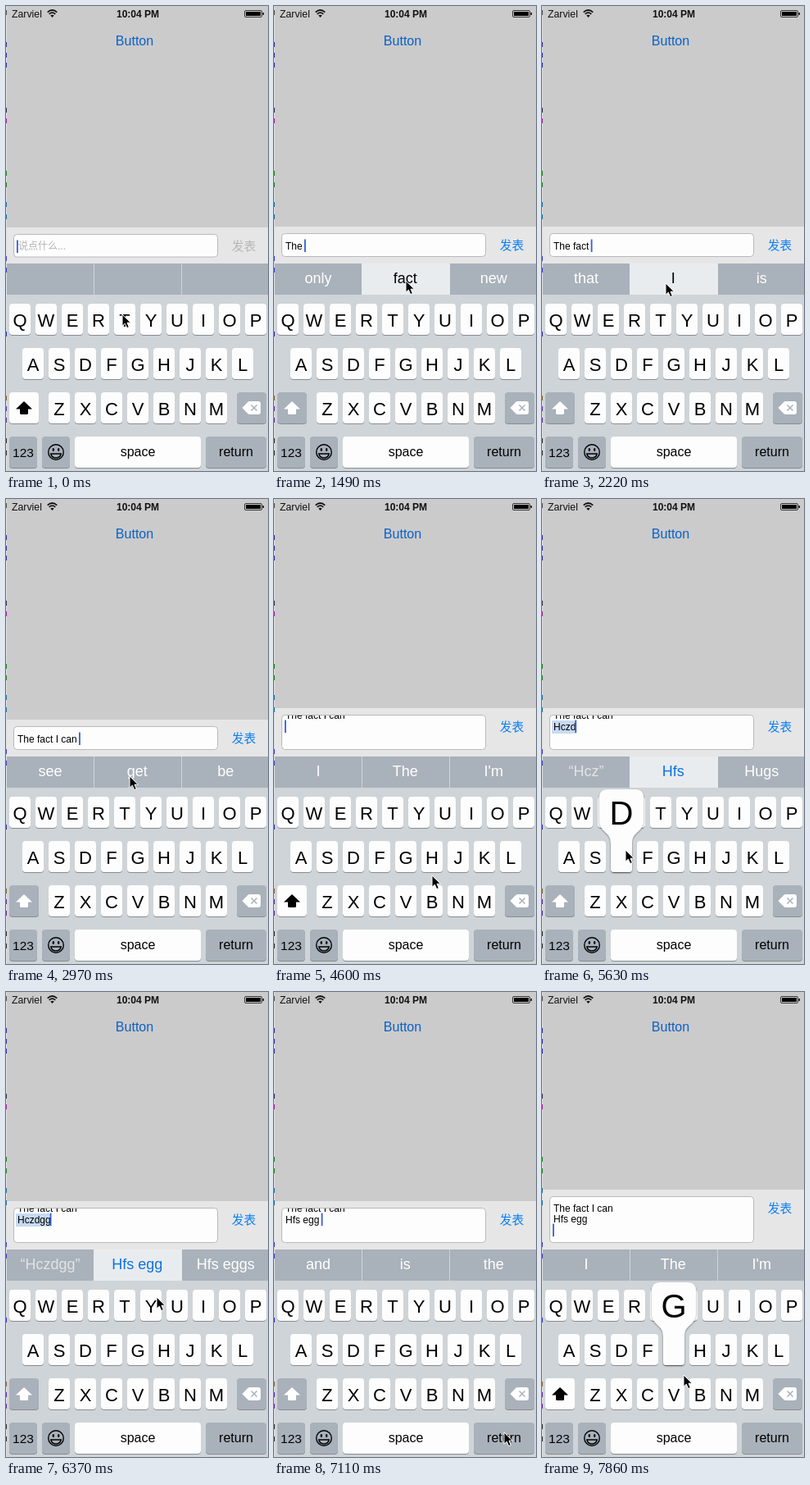
An HTML page that plays this animation: 320 px wide and 567 px high, repeating every 8 s.

```html
<!DOCTYPE html>
<html lang="en">
<head>
<meta charset="utf-8">
<title>Chat keyboard</title>
<style>
html, body { margin: 0; width: 100%; height: 100%; overflow: hidden; background: #cbcbcb; }
svg { display: block; width: 100vw; height: 100vh; }
text { font-family: "Liberation Sans", Arial, sans-serif; white-space: pre; }
.cjk { font-family: "Noto Sans CJK SC", "Noto Sans CJK", sans-serif; }
.mid { text-anchor: middle; }
</style>
</head>
<body>
<svg viewBox="0 0 320 567">
  <defs>
    <filter id="lift" x="-20%" y="-20%" width="140%" height="140%">
      <feDropShadow dx="0" dy="1" stdDeviation="1.3" flood-opacity=".45"/>
    </filter>
    <clipPath id="field"><rect id="fieldClip" x="10" width="248"/></clipPath>
  </defs>
  <g id="base"></g>
  <g id="live"></g>
</svg>
<script>
const LOOP = 8000, TICKS = 54;
const GRAY = '#a9b1ba', BOARD = '#cfd4d8', WHITE = '#fdfdfd', BLUE = '#0b72e0';
const base = document.getElementById('base');
const live = document.getElementById('live');
const fieldClip = document.getElementById('fieldClip');

const rect = (x, y, w, h, fill, extra = '') =>
  `<rect x="${x}" y="${y}" width="${w}" height="${h}" fill="${fill}" ${extra}/>`;
const text = (s, x, y, size, fill, extra = 'class="mid"') =>
  `<text x="${x}" y="${y}" font-size="${size}" fill="${fill}" ${extra}>${s}</text>`;
const key = (x, y, w, fill) =>
  rect(x, y + 1, w, 38, '#888c91', 'rx="4"') + rect(x, y, w, 38, fill, 'rx="4"');

const pen = document.createElement('canvas').getContext('2d');
pen.font = '12px "Liberation Sans", Arial, sans-serif';
const widthOf = s => pen.measureText(s).width;

const ROWS = [['QWERTYUIOP', 4, 363], ['ASDFGHJKL', 20, 417], ['ZXCVBNM', 52, 471]];
const keyPos = {};
for (const [letters, left, y] of ROWS)
  [...letters].forEach((c, i) => keyPos[c] = { x: left + 32 * i, y });

// Each entry holds from its tick until a later one changes the same value.
const START = ['I', 'The', "I'm"];
const script = [
  [0, { lines: [''], words: ['', '', ''], shift: true, top: 270, fade: 1, hot: '', pop: '', empty: true }],
  [1, { words: START, fade: .5 }],
  [2, { fade: 1 }],
  [6, { hot: 'press' }],
  [7, { lines: ['The '], words: ['only', 'fact', 'new'], shift: false, top: 269, hot: '', empty: false }],
  [10, { hot: 'press' }],
  [11, { lines: ['The fact '], words: ['that', 'I', 'is'], hot: '' }],
  [15, { hot: 'press' }],
  [17, { lines: ['The fact I '], words: ['have', 'can', "didn't"], hot: '' }],
  [19, { hot: 'press' }],
  [20, { lines: ['The fact I can '], words: ['see', 'get', 'be'], hot: '' }],
  [27, { lines: ['The fact I can', ''], words: START, shift: true, top: 262, fade: .5 }],
  [28, { top: 255, fade: 1 }],
  [32, { pop: 'H' }],
  [33, { lines: ['The fact I can', 'H'], pop: '', shift: false, words: ['“H”', 'He', 'How'] }],
  [34, { pop: 'C', lines: ['The fact I can', 'Hc'] }],
  [35, { pop: '', words: ['“Hc”', 'Hc', 'Hex'], hot: 'fix' }],
  [36, { pop: 'Z', lines: ['The fact I can', 'Hcz'] }],
  [37, { pop: '', words: ['“Hcz”', 'Hfs', 'Hugs'] }],
  [38, { pop: 'D', lines: ['The fact I can', 'Hczd'] }],
  [39, { pop: '', words: ['“Hczd”', 'Hfs', 'Hugs'] }],
  [40, { pop: 'G', lines: ['The fact I can', 'Hczdg'] }],
  [41, { pop: '', words: ['“Hczdg”', 'Hfs', 'Hugs'] }],
  [42, { pop: 'G', lines: ['The fact I can', 'Hczdgg'] }],
  [43, { pop: '', words: ['“Hczdgg”', 'Hfs egg', 'Hfs eggs'] }],
  [44, { hot: 'press' }],
  [45, { lines: ['The fact I can', 'Hfs egg '], words: ['and', 'is', 'the'], hot: '' }],
  [49, { enter: true }],
  [50, { enter: false, lines: ['The fact I can', 'Hfs egg', ''], words: ['', '', ''], shift: true, top: 248 }],
  [51, { top: 241 }],
  [52, { words: START, fade: .45 }],
  [53, { fade: 1, pop: 'G' }]
];

// Pointer stops: tick, x, y
const path = [
  [0, 142, 376], [1, 142, 376], [5, 161, 335], [11, 161, 335], [14, 151, 338], [21, 151, 338],
  [25, 280, 535], [29, 280, 535], [31, 193, 459], [32, 193, 434], [33, 165, 455], [34, 130, 484],
  [36, 64, 484], [38, 102, 428], [40, 161, 430], [42, 161, 430], [43, 184, 372], [44, 172, 336],
  [45, 172, 336], [48, 281, 537], [50, 281, 537], [52, 228, 470], [53, 173, 467]
];

function pointer(n) {
  const i = Math.max(1, path.findIndex(p => p[0] >= n));
  const [t0, x0, y0] = path[i - 1], [t1, x1, y1] = path[i];
  const k = (n - t0) / (t1 - t0), e = k * k * (3 - 2 * k);
  return [x0 + (x1 - x0) * e, y0 + (y1 - y0) * e];
}

function drawBase() {
  let s = rect(0, 0, 320, 567, '#cbcbcb');
  s += text('Zarviel', 7, 13.7, 12.3, '#111', '');
  s += text('10:04 PM', 161, 13.7, 12, '#111', 'class="mid" font-weight="bold"');
  s += `<g fill="none" stroke="#111" stroke-width="1.7"><path d="M50.7 7.6Q56.5 2.4 62.3 7.6M52.7 9.9Q56.5 6.5 60.3 9.9"/></g>
    <path d="M54.3 11.6Q56.5 9.8 58.7 11.6L56.5 14Z" fill="#111"/>`;
  s += rect(291.5, 5.5, 21, 8, 'none', 'rx="1.5" stroke="#111" stroke-width=".8"') +
    rect(293, 7, 18, 5, '#000') + rect(313.5, 8, 1.5, 3, '#111');
  s += text('Button', 157, 47.8, 16, '#0a60c6');
  s += rect(0, 352, 320, 215, BOARD);
  for (const c in keyPos) {
    const { x, y } = keyPos[c];
    s += key(x, y, 26, WHITE) + text(c, x + 13, y + 27.5, 22, '#000');
  }
  s += key(282, 471, 36, GRAY) +
    `<path d="M288.5 490L295 483.2Q296 482 298 482H308Q311 482 311 485V495Q311 498 308 498H298Q296 498 295 496.8Z" fill="#fff"/>
     <path d="M299.5 486.5l7 7m0-7l-7 7" stroke="${GRAY}" stroke-width="1.5"/>`;
  s += key(4, 525, 34, GRAY) + text('123', 21, 550, 15.5, '#000');
  s += key(44, 525, 34, GRAY) +
    `<g fill="none" stroke="#000" stroke-width="1.4"><circle cx="61" cy="544" r="9.3"/>
     <path d="M54.8 546H67.2Q66 551 61 551Q56 551 54.8 546Z"/></g>
     <ellipse cx="57.8" cy="541" rx="1.2" ry="2"/><ellipse cx="64.2" cy="541" rx="1.2" ry="2"/>`;
  s += key(84, 525, 154, WHITE) + text('space', 161, 549, 16, '#000');
  base.innerHTML = s;
}

function drawBar({ top, lines, empty, hot }) {
  const boxTop = top + 8.5, boxH = 305.5 - boxTop + (empty ? .5 : 0);
  fieldClip.setAttribute('y', boxTop + .5);
  fieldClip.setAttribute('height', boxH - 1);
  let s = rect(0, top, 320, 314 - top, '#e6e6e7');
  s += rect(9.5, boxTop, 249, boxH, WHITE, 'rx="4" stroke="#b9b9bb"');
  s += text('发表', 290.5, top + 27.5, 14.7, empty ? '#b7b7b7' : '#0c7ff2', 'class="cjk mid"');
  if (empty) s += text('说点什么...', 15, 297.3, 12, '#b4b4b8', 'class="cjk"');

  const last = lines.length - 1;
  const first = lines.length === 1 ? top + 28 : lines.length === 2 ? top + 13.2 : top + 26.8;
  const lineY = i => first + 13.4 * i;
  const w = widthOf(lines[last]), y = lineY(last);
  s += '<g clip-path="url(#field)">';
  if (hot === 'fix') s += rect(12, y - 11.5, w + 2, 16, '#c7dbf1');
  lines.forEach((line, i) => s += text(line, 14, lineY(i), 12, '#000', ''));
  s += rect(13 + w, y - (last === 0 ? 12.5 : 12), 1.8, 15.5, '#355fd6') + '</g>';
  return s;
}

function drawWords({ words, hot, fade }) {
  let s = rect(0, 314, 320, 38, GRAY);
  s += rect(107, 314, 1, 38, BOARD) + rect(214, 314, 1, 38, BOARD);
  if (hot) s += rect(107, 314, 108, 38, '#e9ecef');
  words.forEach((word, i) => {
    const fill = i === 1 && hot ? (hot === 'press' ? '#000' : BLUE) : '#fff';
    const alpha = word[0] === '“' ? .65 : fade;
    s += text(word, [54, 160.3, 268.3][i], 338, 18, fill, `class="mid" opacity="${alpha}"`);
  });
  return s;
}

// One-pixel sliver of an editor window behind the phone
function drawSliver() {
  let s = rect(0, 0, 1, 567, '#e2e2e4');
  const marks = [[8, '#555'], [47, '#33a'], [60, '#33a'], [72, '#33a'], [127, '#335'], [140, '#a2a'],
    [204, '#282'], [218, '#282'], [242, '#27a'], [257, '#27a'], [308, '#44b'], [322, '#44b'],
    [400, '#33b'], [478, '#863'], [491, '#639'], [505, '#639'], [530, '#333'], [545, '#333']];
  for (const [y, c] of marks) s += rect(0, y - 3, 1, 6, c);
  return s;
}

function drawPopup(c) {
  const { x, y } = keyPos[c];
  return `<g transform="translate(${x} ${y})">
    <path filter="url(#lift)" fill="${WHITE}" d="M0 34V2C0 -12 -14 -10 -14 -26V-53Q-14 -63 -4 -63H30Q40 -63 40 -53V-26C40 -10 26 -12 26 2V34Q26 38 22 38H4Q0 38 0 34Z"/>
    ${text(c, 13, -20.5, 40, '#000')}</g>`;
}

function render(n) {
  const state = Object.assign({}, ...script.filter(e => e[0] <= n).map(e => e[1]));
  const [px, py] = pointer(n);
  let s = drawBar(state) + drawWords(state) + drawSliver();
  s += key(4, 471, 36, state.shift ? WHITE : GRAY) +
    `<path d="M22 482L32 491.5H27V496.5Q27 498 25.5 498H18.5Q17 498 17 496.5V491.5H12Z" fill="${state.shift ? '#000' : '#fff'}"/>`;
  s += key(244, 525, 74, state.enter ? WHITE : GRAY) + text('return', 281, 549, 16, '#000');
  if (state.pop) s += drawPopup(state.pop);
  s += `<path transform="translate(${px} ${py})" d="M0 0V14.2L3.3 11.2L5.7 16.6L8.3 15.5L6 10.2H10.4Z" fill="#000" stroke="#fff" stroke-width="1" stroke-linejoin="round"/>`;
  live.innerHTML = s;
}

let shown = -1;
function frame(now) {
  const n = Math.floor(((now + 5) % LOOP) / LOOP * TICKS);
  if (n !== shown) render(shown = n);
  requestAnimationFrame(frame);
}

drawBase();
render(0);
requestAnimationFrame(frame);
</script>
</body>
</html>
```
